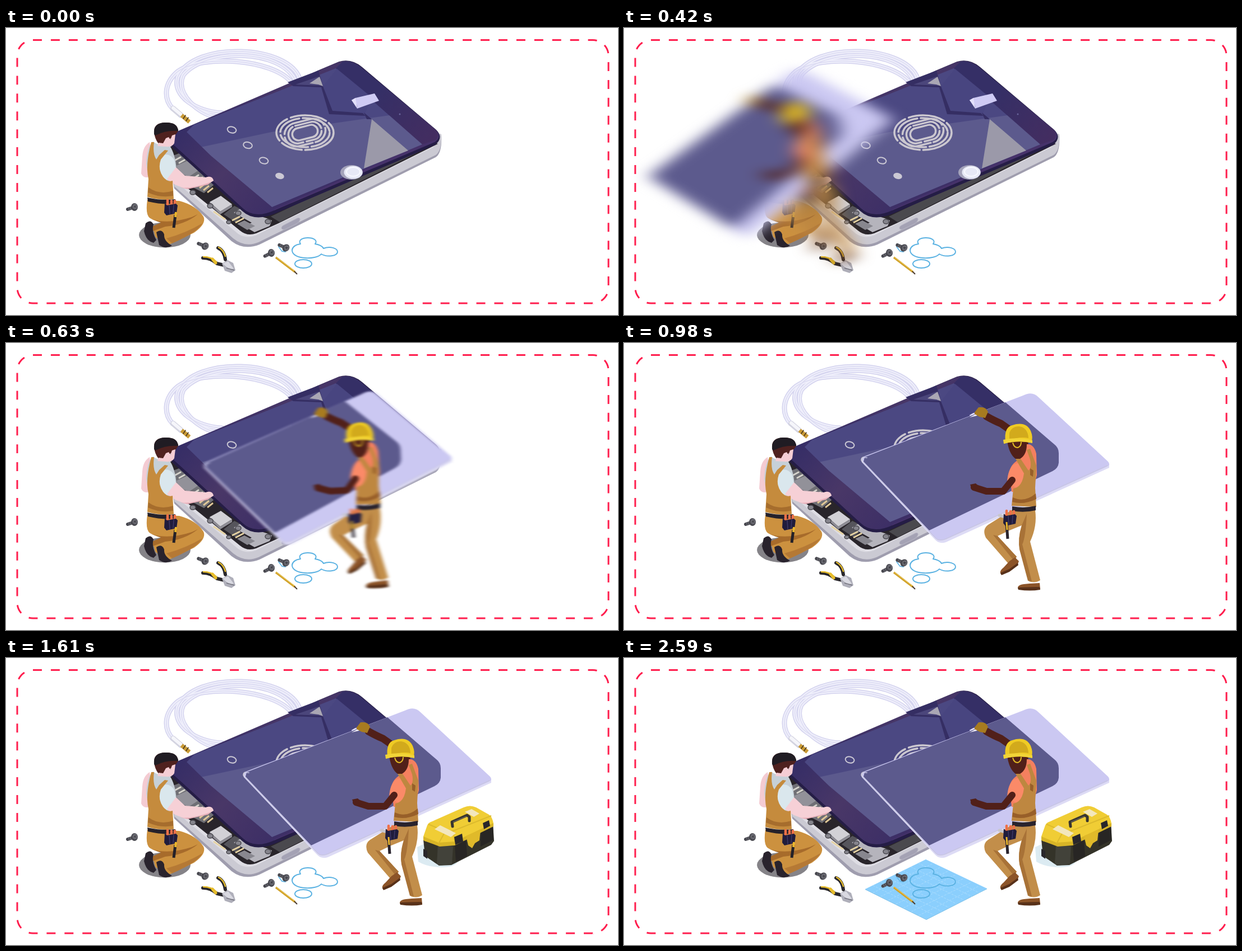
Recreate the animation shown at these times as an HTML page. Size 1091 by 513 pixels, loop 5.25 s.

```html
<!DOCTYPE html>
<html lang="en">
<head>
<meta charset="utf-8">
<title>Phone repair</title>
<style>
  html, body { margin: 0; width: 100%; height: 100%; overflow: hidden; background: #fff; }
  svg { display: block; width: 100%; height: 100%; }
  .line { fill: none; stroke-linecap: round; stroke-linejoin: round; }
</style>
</head>
<body>
<svg viewBox="0 0 1091 513">
  <defs>
    <linearGradient id="bezel" x1="300" y1="190" x2="470" y2="330" gradientUnits="userSpaceOnUse">
      <stop offset="0" stop-color="#352d66"/><stop offset=".5" stop-color="#493767"/><stop offset="1" stop-color="#3d2f66"/>
    </linearGradient>
    <linearGradient id="edge" x1="590" y1="60" x2="770" y2="200" gradientUnits="userSpaceOnUse">
      <stop offset=".4" stop-color="#352f66"/><stop offset="1" stop-color="#442d60"/>
    </linearGradient>
    <filter id="smear" filterUnits="userSpaceOnUse" x="-300" y="0" width="1391" height="513" color-interpolation-filters="sRGB">
      <feGaussianBlur id="blur" stdDeviation="0"/>
    </filter>
    <g id="strands">
      <path d="M508 96C475 56 350 46 306 78C280 100 282 128 297 144"/>
      <path d="M516 94C490 36 355 36 316 84C300 118 345 154 372 158"/>
      <path d="M524 92C505 30 335 22 306 88C296 122 340 150 385 152"/>
    </g>
    <g id="screw">
      <path class="line" d="M-12 4L0 0" stroke="#48484f" stroke-width="6"/>
      <path class="line" d="M-11 1l2 5M-8 0l2 5" stroke="#76767e" stroke-width="1"/>
      <ellipse rx="6" ry="7" fill="#48484f"/>
      <ellipse cx="1" cy="-1" rx="4.5" ry="5" fill="#686870"/>
      <path d="M-1 -2l4 3M3 -3l-4 4" stroke="#333339"/>
    </g>
    <g id="pouch">
      <path class="line" d="M-6 -9v12M1 -8v10M7 -8v9" stroke="#ed7049" stroke-width="4.5"/>
      <path d="M-11 -4L-7 0L9 -3L12 0L10 14L-8 18L-12 13Z" fill="#201c3c"/>
      <path d="M-3 0l1 16M5 -1l-1 15" stroke="#3d3866" stroke-width="1.5"/>
    </g>
  </defs>

  <rect width="1091" height="513" fill="#fff"/>
  <rect x="20" y="21.5" width="1054" height="470.5" rx="28" fill="none" stroke="#ff1d4d" stroke-width="3" pathLength="188" stroke-dasharray="1 1"/>

  <!-- cable -->
  <g class="line">
    <use href="#strands" stroke="#d3d2ee" stroke-width="9"/>
    <use href="#strands" stroke="#efeffb" stroke-width="6"/>
    <use href="#strands" stroke="#dcdbf2" stroke-width="1.5"/>
    <path d="M298 144L312 156" stroke="#d3d3e0" stroke-width="10"/>
    <path d="M298 143L311 154" stroke="#f5f5fa" stroke-width="6"/>
    <path d="M313 156L327 168" stroke="#c99a35" stroke-width="7" stroke-linecap="butt"/>
    <path d="M316 162l4-6M321 166l4-6" stroke="#47351d" stroke-width="1.5"/>
  </g>

  <!-- phone case -->
  <path d="M290 230L300 287L402 381Q424 398 452 387L766 231Q778 223 776 190L600 150Z" fill="#9f9dae"/>
  <path d="M290 226L300 283L405 376Q426 393 450 383L766 227Q777 220 776 190L600 150Z" fill="#cbcad3"/>
  <path d="M290 215L304 276L414 368Q428 377 445 371L762 213L770 198L600 150Z" fill="#dedde4"/>
  <path d="M292 212L306 272L417 362Q430 373 446 367L486 349L770 207L600 150Z" fill="#29252b"/>
  <path d="M472 337L748 205L752 213L488 347Z" fill="#4a494e"/>
  <path d="M494 353L519 340Q525 338 524 343Q523 347 518 350L497 360Q491 361 491 357Q491 355 494 353Z" fill="#a4a2b4" stroke="#b8b6c5"/>

  <!-- circuit board -->
  <path d="M293 230L314 222L377 275L353 295L300 268Z" fill="#6f6f75"/>
  <path d="M304 246L322 238Q330 238 342 249L344 254L327 265Q320 266 305 253Z" fill="#929199"/>
  <path d="M302 236l9-5M309 241l9-5M331 271l12-8M338 275l12-8M345 280l12-8" class="line" stroke="#d5d3cc" stroke-width="3"/>
  <path d="M345 286l10-8M352 290l10-8M359 294l10-8" stroke="#dfc797" stroke-width="3"/>
  <path d="M363 311L383 300L403 315L382 328Z" fill="#d2d1d6"/>
  <path d="M363 311L382 328L403 315V320L382 333L363 316Z" fill="#8f8e96"/>
  <path d="M388 333L407 318L430 329L409 347Z" fill="#56555c"/>
  <path d="M406 330L418 323L433 333Q452 334 474 344L470 354L443 365L424 354L438 348Z" fill="#b5b4bc"/>
  <path d="M412 350L425 344L444 354L430 361Z" fill="#88878f"/>
  <path d="M370 328L391 342M403 344L417 337M409 348L424 340" stroke="#e6d3a3" stroke-width="3"/>
  <g fill="#85848c" stroke="#49484f" stroke-width="1.5">
    <ellipse cx="333" cy="294" rx="5" ry="4"/><ellipse cx="364" cy="318" rx="5" ry="4"/>
    <ellipse cx="414" cy="331" rx="5" ry="4"/><ellipse cx="467" cy="346" rx="5" ry="4"/><ellipse cx="397" cy="347" rx="4" ry="3"/>
  </g>

  <!-- lifted display -->
  <path d="M300 188L503 101L556 76L594 60Q616 54 635 70L767 182Q781 196 765 209L479 332Q442 347 421 327L297 214Q287 201 300 188Z" fill="#251d46"/>
  <path d="M300 187L592 61Q615 54 634 71L766 182Q779 194 764 204L478 326Q443 342 422 322L298 208Q289 197 300 187Z" fill="url(#bezel)"/>
  <path d="M479 324L742 207L766 187Q777 195 764 204L478 326Z" fill="#46326a"/>
  <path d="M335 173L588 72L742 208L474 320L318 190Z" fill="#4b4882"/>
  <path d="M338 215L473 186L705 153L742 208L474 320L366 229Z" fill="#5c5a8d"/>
  <path d="M302 192L318 182L366 229L474 320Q450 336 425 322L298 208Z" fill="url(#bezel)"/>
  <path d="M588 72L600 60Q616 57 634 71L766 182Q774 191 766 200L742 208Z" fill="url(#edge)"/>
  <path d="M565 104L590 73L652 124L638 157L576 153Z" fill="#484580"/>
  <path d="M502 97L557 76L565 104L582 148L636 152L641 157L576 154L562 106L512 104Z" fill="#352e63"/>
  <path d="M516 101L557 87L561 103Z" fill="#4b467b"/>
  <path d="M541 99L559 87L565 104L557 101Z" fill="#aaa7b4"/>
  <path d="M638 151L652 163L643 163Z" fill="#352e63"/>
  <path d="M652 163L717 219L638 251Z" fill="#9b99a9"/>
  <path d="M616 129L623 125L657 117L665 130L626 144L625 137Z" fill="#cfcbf4"/>
  <path d="M616 129L623 125L626 144Z" fill="#e3e0fb"/>
  <circle cx="702" cy="154" r="1.5" fill="#69659c"/>
  <g class="line" stroke="#cbc7cf" stroke-width="3.5">
    <ellipse cx="533" cy="187" rx="51" ry="31" stroke-dasharray="65 6 38 6 48 7"/>
    <ellipse cx="533" cy="187" rx="44" ry="26" stroke-dasharray="44 6 57 6"/>
    <g transform="rotate(-14 533 187)">
      <rect x="496" y="166" width="74" height="42" rx="22" stroke-dasharray="58 6 34 5"/>
      <rect x="503" y="171" width="60" height="32" rx="16" stroke-dasharray="52 5 36 6"/>
      <rect x="510" y="176" width="46" height="22" rx="11"/>
    </g>
  </g>
  <g fill="none" stroke="#cbc8d4" stroke-width="2">
    <ellipse cx="402.5" cy="182" rx="8" ry="5.5" transform="rotate(15 402.5 182)"/>
    <ellipse cx="431" cy="209.5" rx="8" ry="5.5" transform="rotate(15 431 209.5)"/>
    <ellipse cx="459.5" cy="237" rx="8" ry="5.5" transform="rotate(15 459.5 237)"/>
    <ellipse cx="488" cy="264.5" rx="7" ry="4.5" transform="rotate(15 488 264.5)" fill="#cbc8d4"/>
  </g>
  <ellipse cx="616" cy="258" rx="20" ry="13" fill="#a4a3ba"/>
  <ellipse cx="619" cy="258" rx="16.5" ry="11.5" fill="#e7e9f6"/>
  <ellipse cx="619" cy="257" rx="12" ry="8" fill="none" stroke="#f8f9ff" stroke-width="2"/>

  <!-- kneeling worker -->
  <ellipse cx="283" cy="370" rx="46" ry="22.5" fill="#858388"/>
  <path d="M256 204Q244 211 243 230L241 260Q244 268 253 267L260 225Z" fill="#f4cbd2"/>
  <path d="M262 203Q274 212 291 209Q302 225 304 253L296 276L256 275L250 243Q251 212 262 203Z" fill="#c6d0d8"/>
  <path d="M276 228Q292 222 300 236L304 258Q292 270 282 275Q268 258 271 240Z" fill="#dae7ed"/>
  <path d="M303 249L319 264L356 267Q368 263 370 273L360 279L324 287Q302 284 287 270Z" fill="#f6d0d6"/>
  <path d="M304 284Q326 290 366 275L360 280L324 288Z" fill="#e7afb9"/>
  <path d="M264 186Q263 170 283 169Q306 168 307 184L303 190L290 200L285 209L272 207Q265 198 264 186Z" fill="#4f211f"/>
  <path d="M280 206L285 197L290 195L293 200L296 192L302 190L300 206Q296 213 286 212L270 211L272 205Z" fill="#f5cdd4"/>
  <path d="M264 190Q262 170 283 169Q306 168 307 184Q286 182 266 192Z" fill="#201c23"/>
  <path d="M259 204L264 204Q261 225 268 235L273 227L283 218L289 219L276 235Q270 252 280 266Q288 276 297 273L299 306Q276 309 252 302L254 270Q248 244 259 204Z" fill="#c58b3d"/>
  <path d="M254 285Q273 299 298 291L298 300Q274 304 253 294Z" fill="#a66d2d"/>
  <path d="M252 307Q248 334 257 340Q274 350 291 347L262 357L266 373L287 389L335 366Q358 350 352 337Q339 317 309 309Z" fill="#cc913f"/>
  <path d="M258 341Q288 352 331 338L342 333Q318 352 284 355L262 363L260 355L276 348Z" fill="#a76b2b"/>
  <path d="M286 376Q322 366 350 349Q342 365 296 385Z" fill="#b57935"/>
  <path d="M252 303Q278 309 302 306L302 314Q276 316 253 310Z" fill="#25212a"/>
  <use href="#pouch" x="294" y="317"/>
  <path d="M302 334L299 357" stroke="#242128" stroke-width="5"/>
  <path d="M303 329L302 338" stroke="#ecb72c" stroke-width="4"/>
  <path d="M249 349Q258 341 263 351Q259 363 268 379L263 384Q250 381 246 363Z" fill="#29232d"/>
  <path d="M268 365Q278 358 282 369Q281 381 296 389Q285 396 273 388Z" fill="#29232d"/>

  <!-- paper -->
  <g id="paper">
    <path d="M430 413L538 360L647 412L539 467Z" fill="#8bcffd"/>
    <path d="M430 413L539 467L647 412V413L539 468L430 414Z" fill="#5eb3e6"/>
    <path id="grid" fill="none" stroke="#a9dcfd" stroke-width="1" stroke-dasharray="4 2"/>
  </g>
  <g class="line" stroke="#5bb2e2" stroke-width="2">
    <path d="M525 386C520 379 529 375 538 375C549 375 556 380 551 386Q563 388 566 394C578 389 591 394 591 400C591 408 572 410 562 404C555 414 510 415 510 397Q511 388 525 386Z"/>
    <ellipse cx="530" cy="421.5" rx="15" ry="7.5"/>
  </g>

  <!-- loose tools -->
  <use href="#screw" x="229" y="320"/>
  <use href="#screw" transform="translate(355 390) rotate(40)"/>
  <use href="#screw" transform="translate(473 402) rotate(-8)"/>
  <path class="line" d="M486 391L492 399L498 400" stroke="#69b8e6" stroke-width="2"/>
  <use href="#screw" transform="translate(499 393) rotate(42)"/>
  <path d="M481 410L515 436" stroke="#d0a027" stroke-width="3.5"/>
  <path d="M481 409L514 434" stroke="#efd065" stroke-width="1"/>
  <path d="M514 435L519 440" stroke="#49382b" stroke-width="2"/>
  <g class="line">
    <path d="M351 411Q365 411 376 421L389 424" stroke="#29272b" stroke-width="6"/>
    <path d="M378 393Q389 398 391 414" stroke="#29272b" stroke-width="6"/>
    <path d="M352 409Q366 409 375 418M379 392Q388 397 391 408" stroke="#e7bd2b" stroke-width="2.5"/>
    <path d="M368 413L374 420" stroke="#e7bd2b" stroke-width="5"/>
  </g>
  <path d="M385 421L395 415L405 420L409 433L402 438L390 434Z" fill="#afafba"/>
  <path d="M386 421L396 417L406 430L399 432Z" fill="#d9d9e1"/>
  <path d="M393 429L407 433" stroke="#73737d" stroke-width="1.5"/>

  <!-- toolbox -->
  <g id="toolbox">
    <path d="M733 338L748 331L806 363Q801 374 778 374Q751 374 735 364Z" fill="#dcebf2"/>
    <path d="M744 325L750 322L868 294L870 327L865 334L804 365L794 370L772 371L747 354Z" fill="#343329"/>
    <path d="M770 334L797 337L795 368L772 371L768 367Z" fill="#42423a"/>
    <path d="M800 334L820 325L822 354L802 364ZM847 310L868 300L869 325L846 337Z" fill="#282624"/>
    <path d="M744 319L751 299Q753 294 760 292L816 267Q827 262 838 267L861 280Q867 284 869 296L868 301L800 334L775 336L746 327Z" fill="#f0cd35"/>
    <path d="M744 319L771 330L800 328L869 295V301L800 335L773 337L744 326Z" fill="#d8b527"/>
    <path d="M753 297L783 310L797 309L865 282M783 310L771 332M797 309L801 333" fill="none" stroke="#dcba2d" stroke-width="2"/>
    <path d="M764 306L774 299L802 313L793 320Z" fill="#f3e7bd"/>
    <path d="M818 275L830 270L844 278L834 284Z" fill="#f3e7bd"/>
    <path d="M820 318L846 307L844 326L836 331L831 340L824 335Z" fill="#e0ba2a"/>
    <path d="M796 301L795 293L822 281L826 284V291" class="line" stroke="#38352f" stroke-width="5"/>
    <path d="M797 293L821 283" stroke="#656057" stroke-width="1.5"/>
    <path d="M799 320L813 314L815 328L801 334ZM850 295L861 290L863 300L852 306ZM744 341L751 345V359L744 354Z" fill="#29272b"/>
  </g>

  <!-- worker carrying the glass -->
  <g id="arrival">
    <g id="carrier">
      <path d="M424 206L424 213L554 351Q562 360 574 356L865 223V217Z" fill="#dddbf5"/>
      <path d="M430 202L711 94Q728 85 739 97L863 212Q868 218 861 221L574 350Q563 355 554 347L426 212Q421 206 430 202Z" fill="#cbc8f2"/>
      <path d="M429 204L680 106L767 181Q775 187 775 197V214Q774 224 764 229L544 335L427 212Z" fill="#5c5a8d"/>
      <path class="line" d="M433 205Q422 203 427 214L556 349Q562 355 574 350L862 219" stroke="#c7c5e3" stroke-width="1.5"/>
      <path d="M616 133L635 123L629 130Z" fill="#f4f1fa"/>

      <path class="line" d="M646 131Q660 139 672 144L692 158" stroke="#512019" stroke-width="13"/>
      <path d="M625 124L632 115Q645 113 649 123L644 134L634 132L625 127Z" fill="#a77b20"/>
      <path d="M683 174L721 174L719 197L710 213L698 207Q686 198 683 174Z" fill="#512019"/>
      <path d="M718 181Q731 180 735 198L736 236L728 266L691 266L687 231Q689 216 706 207Q718 200 718 181Z" fill="#f4805f"/>
      <path d="M695 217Q712 209 714 226Q714 251 704 262L683 249Q684 226 695 217Z" fill="#fb8a68"/>
      <path class="line" d="M692 245L676 265L646 265L624 258" stroke="#512019" stroke-width="12"/>
      <path d="M617 253L627 251L636 259L631 265L621 263Z" fill="#512019"/>
      <path d="M698 207L707 207L721 228Q727 223 724 208L718 191L724 189L735 219L733 259L735 293L691 291L694 260Q710 258 713 233Z" fill="#be8740"/>
      <path d="M693 276Q714 286 734 269L735 279Q712 290 692 284ZM724 224L730 228L729 239L724 236Z" fill="#985f29"/>
      <path d="M692 298L733 299Q737 327 724 355L742 424Q733 430 722 426L706 371Q701 350 709 326L687 335L666 345L700 382Q696 392 684 393L645 348Q638 333 649 325Z" fill="#c28e4a"/>
      <path d="M709 326L718 305Q716 348 710 360L727 426L720 425L705 369Q702 351 709 326ZM666 345L700 382L694 388L658 343Z" fill="#a87237"/>
      <path d="M692 292Q712 296 734 291V299Q713 304 692 300Z" fill="#29232d"/>
      <path d="M669 308L682 312" class="line" stroke="#c8c6cd" stroke-width="5"/>
      <use href="#pouch" x="688" y="309"/>
      <path d="M682 323L684 350" stroke="#29232d" stroke-width="5"/>
      <path d="M682 320L683 334" stroke="#ecb72c" stroke-width="3"/>
      <path d="M687 390L697 383L704 390Q702 399 687 408L673 414Q667 409 677 401Z" fill="#8c5428"/>
      <path d="M723 430L741 429L742 440Q724 444 703 440Q699 433 713 431Z" fill="#8c5428"/>
      <path d="M671 411L687 404L702 393L703 397L687 409L673 415ZM702 437L741 436L742 441Q724 444 703 441Z" fill="#583119"/>
      <path d="M680 176Q677 151 692 147Q716 139 725 157Q730 169 726 178Q702 173 677 180Z" fill="#efcb24"/>
      <path d="M687 161Q691 149 704 149Q720 151 721 170Q704 167 687 174Z" fill="#d2aa1c"/>
      <path d="M676 173Q700 167 728 174V179Q704 173 677 180Z" fill="#f2d437"/>
      <path d="M693 178Q695 187 702 187Q708 185 708 177" fill="none" stroke="#e2bc25" stroke-width="2"/>
    </g>
  </g>
</svg>
<script>
  const LOOP = 5250, STEP = 70;
  const byId = id => document.getElementById(id);
  const clamp = v => Math.min(1, Math.max(0, v));
  const fadeIn = (t, start) => 1 - (1 - clamp((t - start) / 560)) ** 2;

  let grid = '';
  for (let i = 1; i < 8; i++) {
    const k = i / 8;
    grid += `M${430 + 108 * k} ${413 - 53 * k}l109 53M${430 + 109 * k} ${413 + 54 * k}l108 -53`;
  }
  byId('grid').setAttribute('d', grid);

  function draw(now) {
    const t = Math.floor(now % LOOP / STEP) * STEP;
    const shift = 1166 * clamp((980 - t) / 770) ** 3.6;
    const arrival = byId('arrival');
    arrival.style.display = t < 280 ? 'none' : '';
    byId('carrier').setAttribute('transform', `translate(${-shift}) rotate(${-shift * 0.04} 642 265)`);
    byId('blur').setAttribute('stdDeviation', `${shift * 0.045} ${shift * 0.025}`);
    if (shift) arrival.setAttribute('filter', 'url(#smear)');
    else arrival.removeAttribute('filter');
    byId('toolbox').style.opacity = fadeIn(t, 1050);
    byId('paper').style.opacity = fadeIn(t, 2030);
  }

  const start = performance.now();
  function tick() {
    draw(performance.now() - start);
    requestAnimationFrame(tick);
  }
  tick();
</script>
</body>
</html>
```
